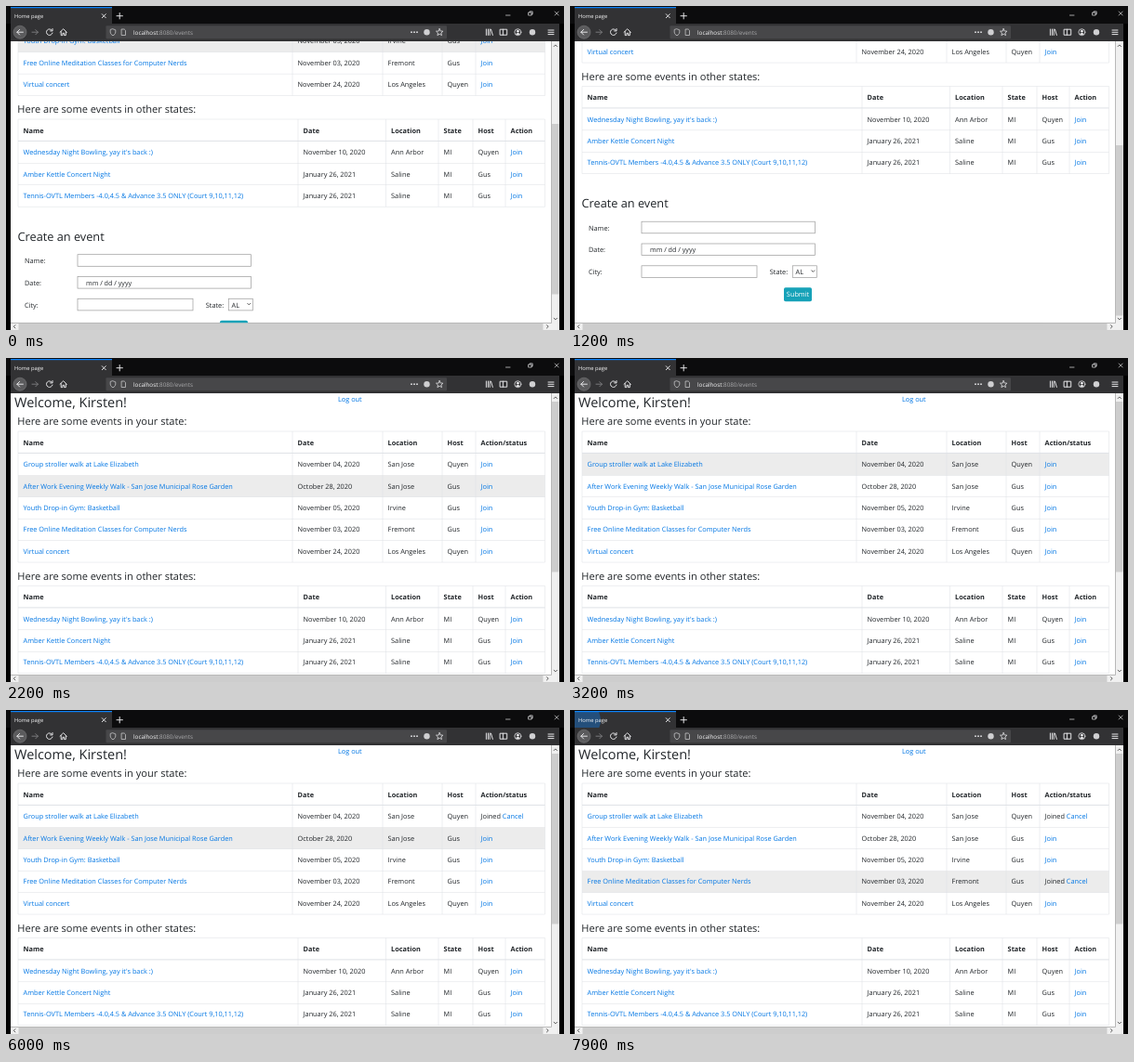
An HTML page for the animation above (8000 ms loop, 600 by 349 pixels).

```html
<!DOCTYPE html>
<html lang="en">
<head>
<meta charset="utf-8">
<title>Home page</title>
<style>
html, body { margin: 0; width: 100%; height: 100%; overflow: hidden; background: #000; }
svg { display: block; width: 600px; height: 349px; }
text { font: 7.33px "Open Sans", "Noto Sans", sans-serif; fill: #212529; white-space: pre; text-rendering: geometricPrecision; }
.b { font-weight: 700; }
.link { fill: #0076e4; }
.over { fill: #0056b3; text-decoration: underline; }
.icon { fill: none; stroke: #e4e4e6; stroke-width: 1; stroke-linecap: round; stroke-linejoin: round; }
.thin { stroke-width: .8; }
.arrow { fill: none; stroke: #555; stroke-width: 1; }
</style>
</head>
<body>
<svg id="stage" viewBox="0 0 600 349">
  <defs>
    <clipPath id="view"><rect x="5" y="38" width="581.5" height="303.5"/></clipPath>
    <clipPath id="tabBox"><rect x="5" y="2" width="109" height="17"/></clipPath>
  </defs>
  <rect width="600" height="349"/>
  <g id="chrome"></g>
  <g clip-path="url(#view)">
    <rect x="5" y="38" width="582" height="304" fill="#fff"/>
    <g id="page"></g>
  </g>
  <g id="bars"></g>
  <g id="status"></g>
</svg>
<script>
const $ = id => document.getElementById(id);
const LOOP = 8000, ROW = 23.43, BOTTOM = 159;

const rect = (x, y, w, h, fill, more = '') =>
  `<rect x="${x}" y="${y}" width="${w}" height="${h}" fill="${fill}" ${more}/>`;
const text = (x, y, s, cls = '', more = '') =>
  `<text x="${x}" y="${y}" class="${cls}" ${more}>${s}</text>`;
const sized = (x, y, s, px, fill = '#212529', more = '') =>
  text(x, y, s, '', `style="font-size:${px}px;fill:${fill}" ${more}`);
const icon = (d, more = '') => `<path class="icon" d="${d}" ${more}/>`;

const local = {
  y: 79, left: [13, 308, 405, 469, 505, 579.5],
  head: ['Name', 'Date', 'Location', 'Host', 'Action/status'],
  rows: [
    ['Group stroller walk at Lake Elizabeth', 'November 04, 2020', 'San Jose', 'Quyen'],
    ['After Work Evening Weekly Walk - San Jose Municipal Rose Garden', 'October 28, 2020', 'San Jose', 'Gus'],
    ['Youth Drop-in Gym: Basketball', 'November 05, 2020', 'Irvine', 'Gus'],
    ['Free Online Meditation Classes for Computer Nerds', 'November 03, 2020', 'Fremont', 'Gus'],
    ['Virtual concert', 'November 24, 2020', 'Los Angeles', 'Quyen']
  ]
};
const away = {
  y: 245.5, left: [13, 314, 408.5, 465, 502, 537, 579.5],
  head: ['Name', 'Date', 'Location', 'State', 'Host', 'Action'],
  rows: [
    ['Wednesday Night Bowling, yay it\'s back :)', 'November 10, 2020', 'Ann Arbor', 'MI', 'Quyen'],
    ['Amber Kettle Concert Night', 'January 26, 2021', 'Saline', 'MI', 'Gus'],
    ['Tennis-OVTL Members -4.0,4.5 &amp; Advance 3.5 ONLY (Court 9,10,11,12)', 'January 26, 2021', 'Saline', 'MI', 'Gus']
  ]
};

let rowCount = 0;
function table({ y, left, head, rows }) {
  const top = y + 23.9, bottom = top + rows.length * ROW;
  const action = left[left.length - 2] + 5.6;
  let out = '';
  rows.forEach((cells, r) => {
    const ry = top + r * ROW, n = rowCount++;
    out += rect(13, ry, 566.5, ROW, '#ececec', `id="row${n}" visibility="hidden"`);
    cells.forEach((s, c) => out += text(left[c] + 5.6, ry + 14.2, s, c ? '' : 'link'));
    out += `<g id="act${n}">${text(action, ry + 14.2, 'Join', 'link')}</g>`;
    out += `<g id="done${n}" visibility="hidden">${text(action, ry + 14.2, 'Joined <tspan class="link">Cancel</tspan>')}</g>`;
    out += rect(13, ry + ROW - .25, 566.5, .5, '#dcdfe3');
  });
  head.forEach((s, c) => out += text(left[c] + 5.6, y + 14.9, s, 'b'));
  left.forEach(x => out += rect(x - .25, y, .5, bottom - y, '#dcdfe3'));
  return out + rect(13, y - .25, 566.5, .5, '#dcdfe3') + rect(13, top - 1, 566.5, 1, '#dee2e6');
}

const field = (x, y, w) => rect(x, y, w, 12.6, '#fff', 'stroke="#9a9a9a" stroke-width=".7"');

$('page').innerHTML =
  sized(9, 53.3, 'Welcome, Kirsten!', 14.5) +
  text(357, 47.2, 'Log out', 'link') +
  sized(12.3, 72.2, 'Here are some events in your state:', 11.05) +
  table(local) +
  sized(12.3, 238.9, 'Here are some events in other states:', 11.05) +
  table(away) +
  sized(12.5, 376.3, 'Create an event', 12.75) +
  text(20, 400.6, 'Name:') + field(77, 391.2, 186.6) +
  text(20, 424.4, 'Date:') + field(77, 415, 186.6) + sized(86, 424.2, 'mm / dd / yyyy', 7.15) +
  text(20, 448, 'City:') + field(77, 438.8, 124) +
  text(214.8, 448, 'State:') + field(239.3, 438.8, 26) + text(242.5, 448, 'AL') +
  '<path class="arrow thin" d="M259.5 443.6l1.8 1.8 1.8-1.8"/>' +
  rect(230, 462.3, 30, 15, '#17a2b8', 'rx="1.8"') +
  sized(245, 472.4, 'Submit', 7.33, '#fff', 'text-anchor="middle"');

$('chrome').innerHTML =
  rect(0, 0, 600, 19, '#0c0c0d') + rect(5, 1, 109, 18, '#323234') +
  '<circle id="burst" cx="14" cy="11" r="19" fill="#0a84ff" opacity=".35" visibility="hidden" clip-path="url(#tabBox)"/>' +
  rect(5, 1, 109, 1.2, '#0a84ff') +
  '<circle id="dot" cy="10.5" r="1.7" fill="#0a84ff" visibility="hidden"/>' +
  `<g id="title">${sized(9, 13, 'Home page', 5.8, '#f9f9fa')}</g>` +
  icon('M103.3 8.7l4 4m0-4l-4 4M119 10.7h6.4M122.2 7.5v6.4') +
  icon('M537.5 10h4.5M590.2 6l4 4m0-4l-4 4M562 7h3.2v3h-3.2zM563 6.9v-1h3.2v3h-1', 'style="stroke-width:.7"') +
  rect(5, 19, 590, 19, '#323234') +
  '<circle cx="15" cy="28.2" r="7" fill="#5b5b5d" stroke="#77777a" stroke-width=".6"/>' +
  icon('M18.4 28.2h-6.6m2.8-2.8l-2.8 2.8 2.8 2.8') +
  icon('M28 28.2h6.4m-2.6-2.6l2.6 2.6-2.6 2.6', 'style="stroke:#79797b"') +
  icon('M49.6 26.4a3.3 3.3 0 1 0 .4 2.6M50 24.5v2.4h-2.4') +
  icon('M58 28.3l3.7-3.6 3.7 3.6M59.2 27.6v4h1.7v-2.3h1.7v2.3h1.7v-4') +
  rect(107.5, 21.2, 366.5, 14, '#474749', 'rx="1"') +
  icon('M115 24.8l2.8 1v2.2c0 2-1.3 3-2.8 3.8-1.5-.8-2.8-1.8-2.8-3.8v-2.2z', 'style="stroke:#c4c4c6;stroke-width:.8"') +
  icon('M124.5 25h2.7l1.3 1.3v5.2h-4z', 'style="stroke:#c4c4c6;stroke-width:.8"') +
  sized(137, 30.6, 'localhost<tspan fill="#a9a9ab">:8080/events</tspan>', 6.3, '#f9f9fa') +
  [436, 439, 442].map(x => `<circle cx="${x}" cy="28.2" r=".9" fill="#e4e4e6"/>`).join('') +
  '<circle cx="452.5" cy="28.2" r="3.2" fill="#d0d0d2"/>' +
  icon('M466.2 24.5l1.1 2.5 2.6.2-2 1.8.6 2.6-2.3-1.4-2.3 1.4.6-2.6-2-1.8 2.6-.2z', 'style="stroke-width:.8"') +
  icon('M516.4 25v6.4M518.4 25v6.4M520.2 25v6.4M521.5 25.2l1.8 6.2') +
  icon('M531.5 25.2h7.2v6h-7.2zM534.4 25.2v6') +
  '<circle class="icon thin" cx="550.4" cy="28.2" r="3.5"/><circle cx="550.4" cy="27.2" r="1.4" fill="#e4e4e6"/>' +
  '<path d="M548 30.3q2.4-2.4 4.8 0-2.4 2-4.8 0" fill="#e4e4e6"/>' +
  '<circle cx="566" cy="28.2" r="3.2" fill="#d0d0d2"/>' +
  icon('M583 26h6M583 28.3h6M583 30.6h6');

$('bars').innerHTML =
  rect(586.5, 38, 8.5, 311, '#f0f0f0') + rect(5, 341.5, 590, 7.5, '#f0f0f0') +
  rect(587, 0, 7.6, 183.5, '#cdcdcd', 'id="thumb"') + rect(13.5, 342, 564, 7, '#cdcdcd') +
  '<path class="arrow" d="M588.9 43.8l1.9-1.9 1.9 1.9M588.9 336l1.9 1.9 1.9-1.9M10.2 343.4l-1.9 1.9 1.9 1.9M581.2 343.4l1.9 1.9-1.9 1.9"/>';

$('status').innerHTML =
  rect(4.8, 339.3, 78, 10, '#333334', 'stroke="#656566" stroke-width=".5"') +
  sized(8, 346.6, 'Waiting for localhost…', 6.2, '#f9f9fa');

// [time, value] steps; each value holds until the next
const hovers = [[0, 2], [100, 3], [300, 4], [700, 5], [800, 6], [900, 7], [1000, -1], [1700, 7], [1800, 6],
  [1900, 4], [2000, 3], [2100, 2], [2200, 1], [2300, 0], [2400, -1], [2800, 0], [5900, 1], [6200, 2], [6500, 3]];
const scrolls = [[0, 123.5], [100, 143.5], [200, 153], [300, 157.5], [400, BOTTOM],
  [1300, 158], [1400, 154], [1500, 146], [1600, 60], [1700, 0]];
const underlines = [[0, -1], [4100, 0], [5800, -1], [6900, 3], [7800, -1]];

const pick = (steps, t) => steps.reduce((v, [at, value]) => t >= at ? value : v, 0);
const within = (t, a, b) => t >= a && t < b;
const show = (id, on) => $(id).setAttribute('visibility', on ? 'visible' : 'hidden');

function draw(now) {
  const t = Math.floor(now % LOOP / 100) * 100;
  const y = pick(scrolls, t), hover = pick(hovers, t), under = pick(underlines, t);
  $('page').setAttribute('transform', `translate(0 ${-y})`);
  $('thumb').setAttribute('y', 47 + y / BOTTOM * 103);
  for (let i = 0; i < rowCount; i++) {
    const joined = i === 0 && t >= 5800 || i === 3 && t >= 7800;
    show('row' + i, i === hover);
    show('act' + i, !joined);
    show('done' + i, joined);
    $('act' + i).firstChild.setAttribute('class', i === under ? 'link over' : 'link');
  }
  const loading = within(t, 5700, 5800) || within(t, 7400, 7800);
  show('burst', within(t, 5800, 5900) || t >= 7800);
  show('dot', loading);
  $('dot').setAttribute('cx', 11.5 + 2.5 * Math.sin(t / 130));
  $('title').setAttribute('transform', `translate(${loading ? 10 : 0} 0)`);
  show('status', within(t, 4500, 5800) || within(t, 7100, 7800));
}

const start = performance.now();
function tick() {
  draw(performance.now() - start);
  requestAnimationFrame(tick);
}
tick();
</script>
</body>
</html>
```
